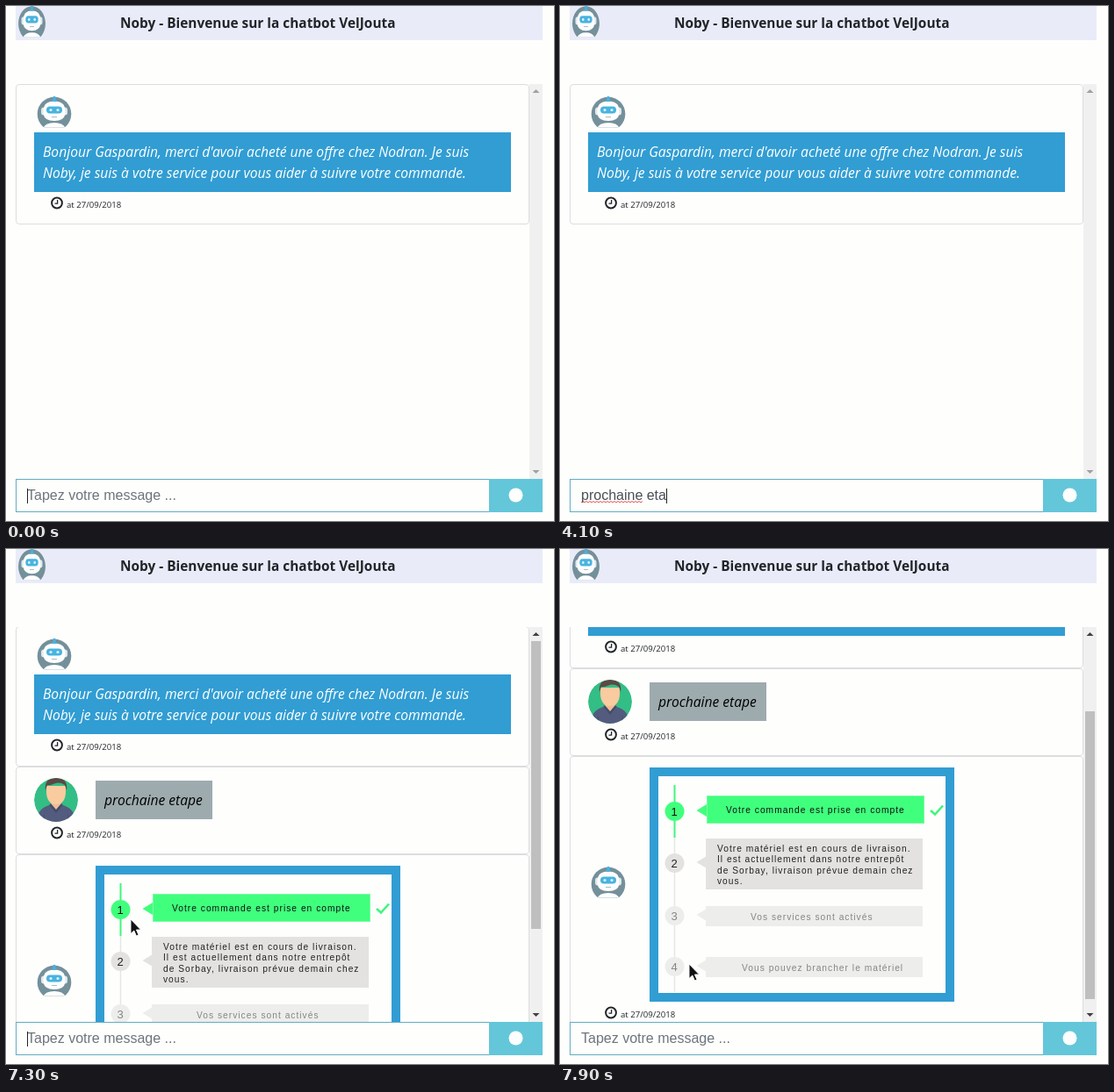
An HTML page for the animation above (8 s loop, 624x587 px).

```html
<!DOCTYPE html>
<html lang="fr">
<head>
<meta charset="utf-8">
<title>Chatbot</title>
<style>
html, body { margin: 0; width: 100%; height: 100%; overflow: hidden; background: #fefefd; }
svg { display: block; }
text { white-space: pre; }
.title { font: bold 15.4px "Open Sans", sans-serif; fill: #212529; }
.say { font: italic 15.65px "Open Sans", sans-serif; }
.date { font: 9.6px "Open Sans", sans-serif; fill: #212529; }
.field { font: 16px "Liberation Sans", Arial, sans-serif; }
.step { font: 10.2px "Liberation Sans", Arial, sans-serif; letter-spacing: 1.03px; }
.num { font: 13px "Liberation Sans", Arial, sans-serif; text-anchor: middle; }
.card { fill: none; stroke: #dcdddd; }
</style>
</head>
<body>
<svg width="624" height="587" viewBox="0 0 624 587">
  <defs>
    <clipPath id="view"><rect x="0" y="89" width="596" height="450"/></clipPath>
    <clipPath id="disc"><rect x="-20" y="-22" width="40" height="37.5"/></clipPath>
    <clipPath id="face"><circle r="25"/></clipPath>
    <g id="bot" clip-path="url(#disc)">
      <circle r="19.3" fill="#74909b"/>
      <path d="M-13.5 20Q-13 10 0 10Q13 10 13.5 20Z" fill="#fefefe"/>
      <rect x="-15" y="-7.5" width="30" height="9" rx="3" fill="#dfe8eb"/>
      <path d="M-12.5 -4Q-12 -14.5 0 -14.5Q12 -14.5 12.5 -4V0Q11 8 0 8Q-11 8 -12.5 0Z" fill="#fefefe"/>
      <path d="M-2.5 -14Q-2.5 -17 0 -17Q2.5 -17 2.5 -14Z" fill="#49b3df"/>
      <circle cy="-18.5" r="1.8" fill="#49b3df"/>
      <rect x="-9" y="-8.5" width="18" height="8" rx="4" fill="#49b3df"/>
      <circle cx="-4" cy="-4.5" r="1.6" fill="#d9f1fa"/>
      <circle cx="4" cy="-4.5" r="1.6" fill="#d9f1fa"/>
      <path d="M-3 3.5H3" stroke="#a9bcc4"/>
    </g>
    <g id="user" clip-path="url(#face)">
      <circle r="25" fill="#33be85"/>
      <path d="M-22 26Q-22 10 -8 6L0 14L8 6Q22 10 22 26Z" fill="#535c7f"/>
      <path d="M-6 0V7L0 13L6 7V0Z" fill="#f0bd91"/>
      <path d="M-8 6L-6 4L0 11L6 4L8 6L0 15Z" fill="#444c6c"/>
      <path d="M-14 25V17M14 25V17" stroke="#444c6c"/>
      <path d="M-11 -16H11V-8Q10 5 0 5Q-10 5 -11 -8Z" fill="#f9cb9f"/>
      <path d="M-12 -11Q-14 -25 0 -25Q14 -25 12 -11L10 -17Q4 -21 -2 -18.5Q-7 -16 -10 -17Z" fill="#5a4a45"/>
    </g>
    <g id="stamp">
      <circle cx="58" cy="-5.5" r="5.9" fill="none" stroke="#212529" stroke-width="2"/>
      <path d="M58.6 -9V-4.9H55.5" fill="none" stroke="#212529" stroke-width="1.3"/>
      <text class="date" x="69" y="0">at 27/09/2018</text>
    </g>
  </defs>

  <rect width="624" height="587" fill="#fefefd"/>
  <rect x="11" width="600" height="39" fill="#e9ecf8"/>
  <use href="#bot" transform="translate(29.5 20) scale(.8 1.02)"/>
  <text class="title" x="130" y="25">Noby - Bienvenue sur la chatbot VelJouta</text>

  <g clip-path="url(#view)">
    <g id="list">
      <rect class="card" x="11.5" y="89.5" width="584" height="159" rx="3.5"/>
      <use href="#bot" x="55" y="123"/>
      <rect x="32" y="144" width="543" height="68" fill="#319dd3"/>
      <g class="say" fill="#fff">
        <text x="42" y="172">Bonjour Gaspardin, merci d'avoir acheté une offre chez Nodran. Je suis</text>
        <text x="42" y="196">Noby, je suis à votre service pour vous aider à suivre votre commande.</text>
      </g>
      <use href="#stamp" y="230"/>

      <g id="reply">
        <rect class="card" x="11.5" y="249.5" width="584" height="99" rx="3.5"/>
        <use href="#user" x="57" y="287"/>
        <rect x="102" y="265" width="133" height="44" fill="#9eabae"/>
        <text class="say" x="112" y="293">prochaine etape</text>
        <use href="#stamp" y="330"/>
      </g>

      <g id="answer">
        <rect class="card" x="11.5" y="349.5" width="584" height="316" rx="3.5"/>
        <use href="#bot" x="55" y="495"/>
        <rect x="107" y="367" width="337" height="257" fill="#fefefd" stroke="#319dd3" stroke-width="10"/>
        <path d="M130.5 442V618" stroke="#e6e6e5" stroke-width="1.5"/>
        <path d="M130.5 382V442" stroke="#40f67b" stroke-width="2"/>
        <g id="steps"></g>
        <path d="M422 411L427 415.5L436 405.5" fill="none" stroke="#40f67b" stroke-width="2.6"/>
        <use href="#stamp" y="647"/>
      </g>
    </g>
  </g>

  <rect x="596" y="89" width="15" height="450" fill="#f0f0f0"/>
  <rect id="thumb" x="598" width="11" height="328" fill="#bfbfbf"/>
  <path id="up" d="M599.5 99L603.5 95L607.5 99Z"/>
  <path id="down" d="M599.5 529L603.5 533L607.5 529Z"/>

  <rect x="11.5" y="539.5" width="539" height="37" fill="#fefefd" stroke="#62adc2"/>
  <rect x="550" y="539" width="61" height="38" fill="#63c7d9"/>
  <circle cx="580.5" cy="557.5" r="8" fill="#fefefe"/>
  <path id="wave" fill="none" stroke="#e0564f"/>
  <text id="input" class="field" x="24" y="563"></text>
  <rect id="caret" y="550" width="1" height="17" fill="#222"/>
  <path id="mouse" d="M0 0V16.5L3.8 13L6.4 19L9 17.9L6.4 12H11.5Z" fill="#111" stroke="#fff" stroke-width=".9"/>
</svg>
<script>
const $ = id => document.getElementById(id);
const show = (el, on) => el.setAttribute('visibility', on ? 'visible' : 'hidden');
const pen = document.createElement('canvas').getContext('2d');
pen.font = '16px "Liberation Sans", Arial, sans-serif';

const LOOP = 8000, SENT = 4600, ANSWER = 4900;
const PHRASE = 'prochaine etape';
// [time, typed letters]
const KEYS = [[1600, 2], [1700, 3], [1900, 4], [2100, 6], [2300, 7], [2400, 8], [2600, 9], [2700, 10],
  [2900, 11], [3300, 12], [3500, 13], [3700, 14], [4100, 13], [4300, 14], [4500, 15], [SENT, 0]];
// [time, scroll offset]
const SCROLL = [[7300, 1], [7400, 119], [7500, 126], [7800, 124], [7900, 113]];
// [time, x, y]
const MOUSE = [[6600, 109, 412], [6700, 142, 422], [7400, 142, 422], [7500, 143, 435],
  [7600, 145, 450], [7700, 146, 463], [7800, 147, 473]];
const HIDDEN = [[200, 800], [1400, 1600], [5200, 5800], [6400, 7000], [7600, 8000]];

const STEPS = [
  { y: 412, top: 394, h: 32, fill: '#40ff7d', ink: '#111', x: 189, lines: ['Votre commande est prise en compte'] },
  { y: 471, top: 443, h: 58, fill: '#e3e2e1', ink: '#222', x: 179, lines: ['Votre matériel est en cours de livraison.',
    'Il est actuellement dans notre entrepôt', 'de Sorbay, livraison prévue demain chez', 'vous.'] },
  { y: 531, top: 520, h: 23, fill: '#ededec', ink: '#858585', x: 217, lines: ['Vos services sont activés'] },
  { y: 589, top: 578, h: 23, fill: '#ededec', ink: '#858585', x: 207, lines: ['Vous pouvez brancher le matériel'] }
];

$('steps').innerHTML = STEPS.map((s, i) => {
  const base = s.lines.length > 1 ? 458 : s.top + s.h / 2 + 4;
  const tip = s.y - 1;
  const edge = i ? '' : '<rect x="167.5" y="394.5" width="247" height="31" fill="none" stroke="#7dfaa4"/>';
  return `<circle cx="130.5" cy="${s.y}" r="11" fill="${s.fill}"/>
    <text class="num" x="130" y="${s.y + 5}" fill="${s.ink}">${i + 1}</text>
    <path d="M155.5 ${tip}L167 ${tip - 7}V${tip + 7}Z" fill="${s.fill}"/>
    <rect x="${i ? 166 : 167}" y="${s.top}" width="${i ? 247 : 248}" height="${s.h}" fill="${s.fill}"/>${edge}` +
    s.lines.map((line, k) => `<text class="step" x="${s.x}" y="${base + 12.3 * k}" fill="${s.ink}">${line}</text>`).join('');
}).join('');

let wave = 'M24 566';
for (let x = 26; x <= 94; x += 2) wave += `L${x} ${x % 4 ? 564.5 : 566}`;
$('wave').setAttribute('d', wave);

const latest = (list, t) => list.filter(e => e[0] <= t).pop();

function draw(t) {
  const typed = PHRASE.slice(0, (latest(KEYS, t) || [0, 0])[1]);
  const input = $('input');
  input.textContent = typed || 'Tapez votre message ...';
  input.setAttribute('fill', typed ? '#495057' : '#6c757d');
  show($('wave'), typed.length > 10);
  $('caret').setAttribute('x', Math.round(24 + pen.measureText(typed).width));
  show($('caret'), !HIDDEN.some(([a, b]) => t >= a && t < b));

  const answered = t >= ANSWER;
  show($('reply'), t >= SENT);
  show($('answer'), answered);
  show($('thumb'), answered);

  const y = (latest(SCROLL, t) || [0, 0])[1];
  $('list').setAttribute('transform', `translate(0 ${-y})`);
  $('thumb').setAttribute('y', Math.round(104 + y * .72));
  $('up').setAttribute('fill', y ? '#404040' : '#a0a0a0');
  $('down').setAttribute('fill', answered ? '#404040' : '#a0a0a0');

  const m = latest(MOUSE, t);
  show($('mouse'), m);
  if (m) $('mouse').setAttribute('transform', `translate(${m[1]} ${m[2]})`);
}

const start = performance.now();
function tick() {
  draw((performance.now() - start) % LOOP);
  requestAnimationFrame(tick);
}
tick();
</script>
</body>
</html>
```
